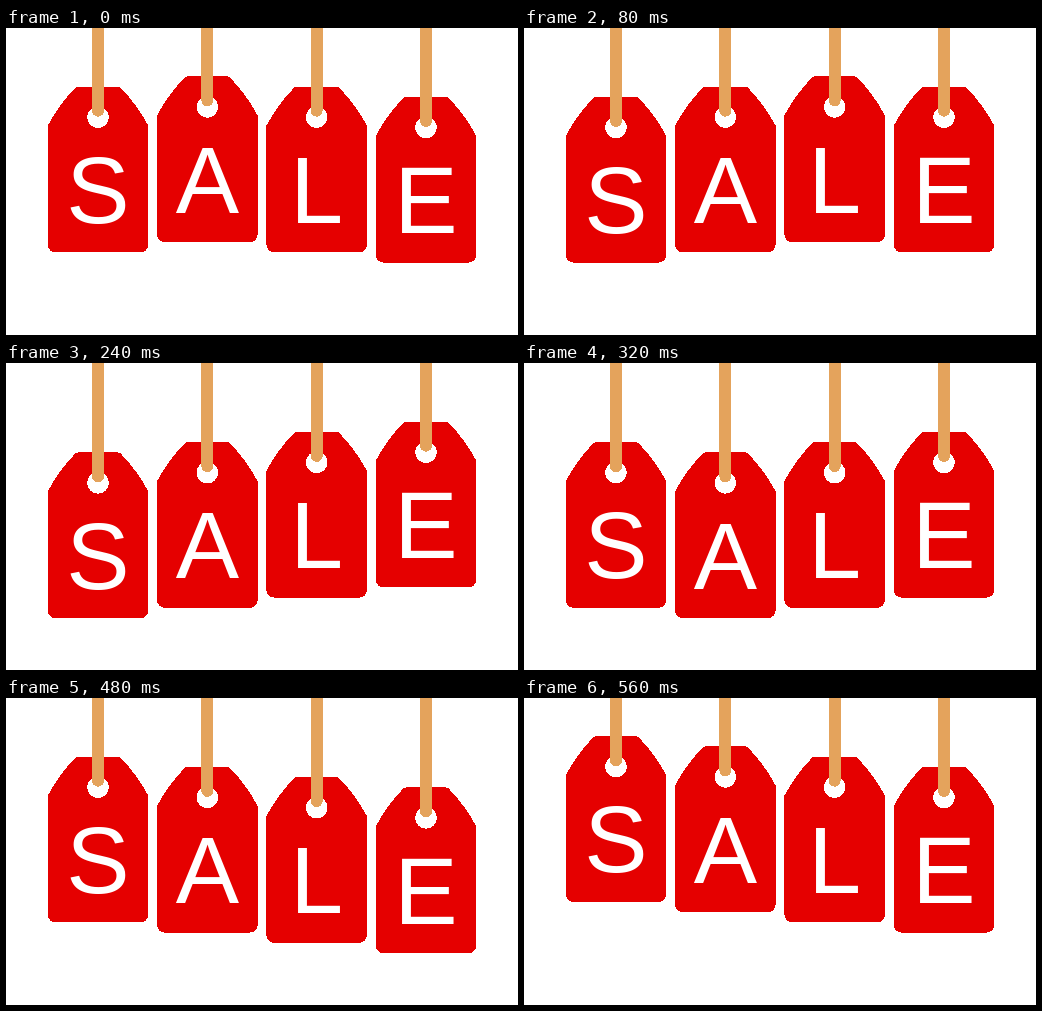
Write an HTML page that moves like this. It is 512 px wide and 307 px high and loops after 640 ms.

```html
<!DOCTYPE html>
<html lang="en">
<head>
<meta charset="utf-8">
<title>Sale tags</title>
<style>
  html, body { margin: 0; width: 100%; height: 100%; overflow: hidden; background: #fff; }
  svg { display: block; width: 100%; height: 100%; }
  path, circle { shape-rendering: crispEdges; }
  text { font: 95px "Liberation Sans", Arial, sans-serif; fill: #fff; text-anchor: middle; }
</style>
</head>
<body>
<svg id="stage" viewBox="0 0 512 307"></svg>
<script>
const STEP_MS = 80, STEPS = 8;
const PITCH = 328 / 3, LIFT = 10.24;
const stage = document.getElementById('stage');

// Each tag is centred on x = 0 with its top edge at y = 0; the strap runs up off stage.
const tagMarkup = letter => `<g>
  <path fill="#e50000" d="M-50.3 39 Q-39 18 -23.5 2 Q-22 0 -20 0 H20 Q22 0 23.5 2 Q39 18 50.3 39
    V158 Q50.3 161 48 163.5 Q46 165.6 43 165.6 H-43 Q-46 165.6 -48 163.5 Q-50.3 161 -50.3 158 Z"/>
  <circle cy="30.5" r="10.7" fill="#fff"/>
  <path d="M0 -120 V24" stroke="#e4a35c" stroke-width="12" stroke-linecap="round"/>
  <text y="136.3">${letter}</text>
</g>`;

stage.innerHTML = [...'SALE'].map(tagMarkup).join('');
const tags = [...stage.children];

// Triangle wave from 1 (high) to 5 (low); the last step lifts every tag one extra level.
function level(step, index) {
  const phase = (step - index + 1 + STEPS) % STEPS;
  return 5 - Math.abs(phase - 4) - (step === STEPS - 1 ? 1 : 0);
}

function draw(now) {
  const step = Math.floor(now / STEP_MS) % STEPS;
  tags.forEach((tag, i) => {
    const x = 92 + PITCH * i;
    const y = 38.2 + LIFT * level(step, i);
    tag.setAttribute('transform', `translate(${x} ${y})`);
  });
}

let start;
function tick(now) {
  start ??= now;
  draw(now - start);
  requestAnimationFrame(tick);
}
draw(0);
requestAnimationFrame(tick);
</script>
</body>
</html>
```
